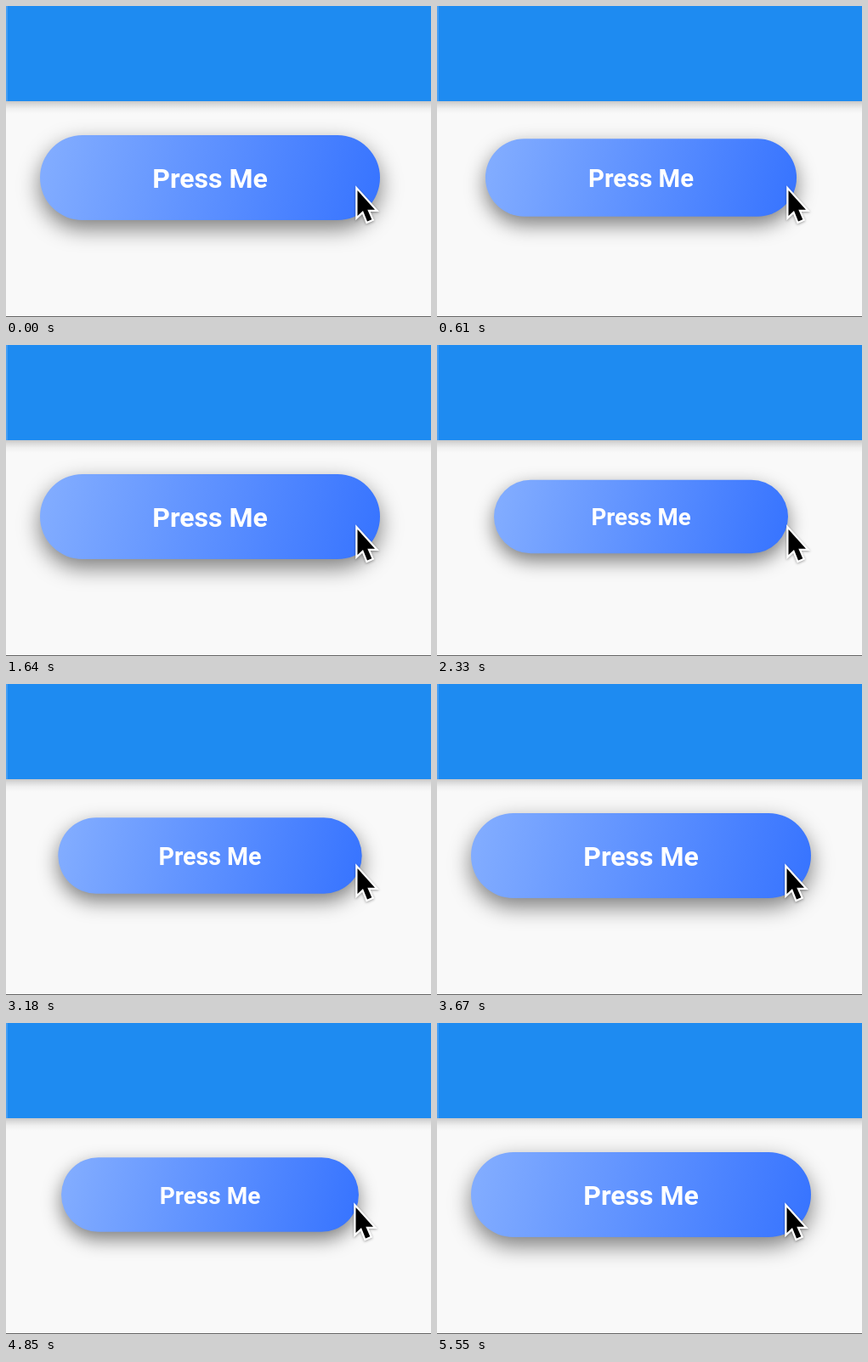
Recreate the animation shown at these times as an HTML page. Size 500 by 366 pixels, loop 5.88 s.

```html
<!DOCTYPE html>
<html lang="en">
<head>
<meta charset="utf-8">
<title>Press Me</title>
<style>
  html, body { margin: 0; width: 100%; height: 100%; overflow: hidden; background: #f9f9f9; }
  svg { display: block; width: 100vw; height: 100vh; }
  text { font: 600 32px Roboto, sans-serif; fill: #fff; text-anchor: middle; }
  #pointer { filter: drop-shadow(0 1.5px 1.5px rgba(0, 0, 0, .35)); }
</style>
</head>
<body>
<svg viewBox="0 0 500 366">
  <defs>
    <linearGradient id="fill" gradientUnits="userSpaceOnUse" x1="-200" y1="-50" x2="200" y2="50">
      <stop offset="0" stop-color="#84aeff"/>
      <stop offset="1" stop-color="#3673ff"/>
    </linearGradient>
    <linearGradient id="fade" x2="0" y2="1">
      <stop offset="0" stop-opacity=".2"/>
      <stop offset=".25" stop-opacity=".12"/>
      <stop offset=".6" stop-opacity=".035"/>
      <stop offset="1" stop-opacity="0"/>
    </linearGradient>
    <filter id="blur" filterUnits="userSpaceOnUse" x="-260" y="-110" width="520" height="240" color-interpolation-filters="sRGB">
      <feGaussianBlur stdDeviation="13"/>
    </filter>
  </defs>

  <rect width="500" height="366" fill="#f9f9f9"/>
  <rect y="112" width="500" height="15" fill="url(#fade)"/>

  <g id="button">
    <rect x="-200" y="-40" width="400" height="100" rx="50" fill-opacity=".5" filter="url(#blur)"/>
    <rect x="-200" y="-50" width="400" height="100" rx="50" fill="url(#fill)"/>
    <text y="12">Press Me</text>
  </g>

  <rect width="500" height="112" fill="#1e8bf1"/>
  <rect width="2" height="112" fill="#469ff4"/>
  <rect y="365" width="500" height="1" fill="#666"/>

  <g id="pointer">
    <path d="M413.5 217V247L420 241L425 253.5L430.3 251.2L425.3 239.8H434Z"
      stroke="#fff" stroke-width="4.5" stroke-miterlimit="6" paint-order="stroke"/>
  </g>
</svg>
<script>
  const LOOP = 5880, STEP = 30, TRAVEL = 200, DEPTH = 0.15;

  // [time of first visible step, progress already made then (ms), pressed?]
  const MOVES = [
    [520, 23, true], [1300, 28, false],
    [2180, 30, true], [3150, 28, false],
    [3730, 28, true], [4850, 33, false]
  ];
  const button = document.getElementById('button');
  const pointer = document.getElementById('pointer');
  const clamp = v => Math.min(1, Math.max(0, v));

  function pressAt(t) {
    const move = MOVES.filter(m => t >= m[0]).pop();
    if (!move) return 0;
    const [start, lead, down] = move;
    const elapsed = Math.floor((t - start) / STEP) * STEP + lead;
    const p = clamp(elapsed / TRAVEL);
    return down ? p : 1 - p;
  }

  function draw(t) {
    const scale = 1 - DEPTH * pressAt(t);
    button.setAttribute('transform', `translate(240 202) scale(${scale})`);
    const drift = Math.round(2 * clamp((t - 3520) / 120));
    pointer.setAttribute('transform', `translate(${-drift} 0)`);
  }

  const origin = performance.now();
  function tick() {
    draw((performance.now() - origin) % LOOP);
    requestAnimationFrame(tick);
  }
  draw(0);
  requestAnimationFrame(tick);
</script>
</body>
</html>
```
